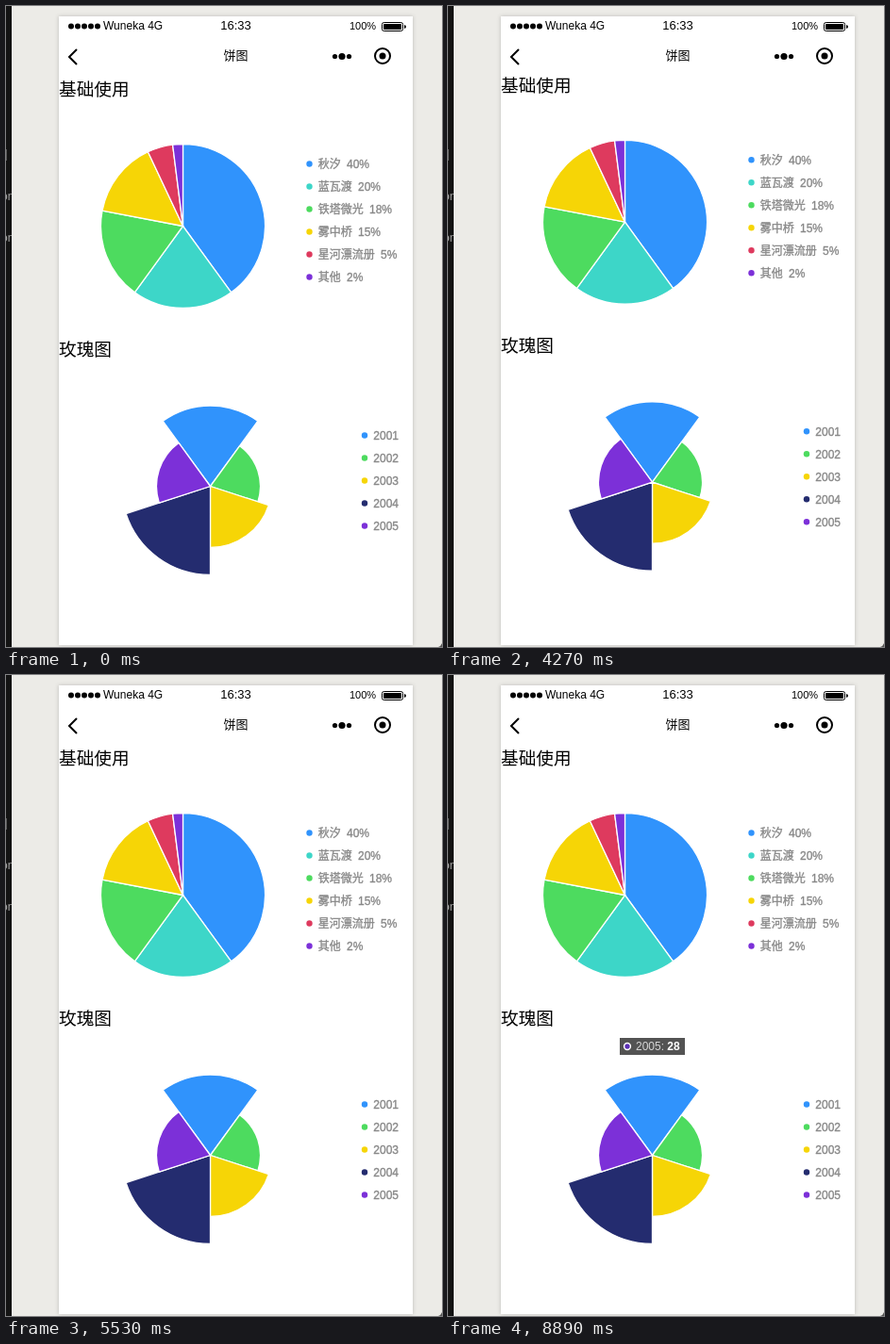
Animation, 462 px wide and 680 px high, one loop 8960 ms. Source, as an HTML page:

```html
<!DOCTYPE html>
<html lang="zh-CN">
<head>
<meta charset="utf-8">
<title>饼图</title>
<style>
  html, body { margin: 0; width: 100%; height: 100%; overflow: hidden; background: #ecebe7; }
  svg { display: block; width: 462px; height: 680px; }
  text { font-family: "Liberation Sans", "Noto Sans CJK SC", "Noto Sans CJK", sans-serif; font-size: 12px; }
  .phone { filter: drop-shadow(0 0 2px rgba(0, 0, 0, .2)); }
  .heading { font-size: 18.67px; }
  .legend { fill: #888; stroke: #888; stroke-width: .35px; }
  .slice { stroke: #fff; stroke-width: 1.3px; stroke-linejoin: round; }
</style>
</head>
<body>
<svg viewBox="0 0 462 680">
  <defs>
    <clipPath id="page"><rect x="56" y="75" width="375" height="603"/></clipPath>
    <clipPath id="strip"><rect width="6" height="680"/></clipPath>
  </defs>
  <rect width="462" height="680" fill="#ecebe7"/>
  <rect width="6" height="680" fill="#131313"/>
  <g clip-path="url(#strip)" fill="#a8a8a8">
    <text x="-2" y="161">]</text>
    <text x="-5" y="206">on</text>
    <text x="-5" y="250">on</text>
  </g>
  <path d="M462 676V680H458Q461 679 462 676Z" fill="#555"/>
  <rect class="phone" x="56" y="11" width="375" height="667" fill="#fff"/>

  <g clip-path="url(#page)">
    <g id="content">
      <text class="heading" x="56" y="95">基础使用</text>
      <text class="heading" x="56" y="371">玫瑰图</text>
      <g id="charts"></g>
      <g id="tip">
        <rect x="182" y="385" width="69" height="18" fill="#535353"/>
        <circle cx="190" cy="394" r="3.4" fill="#5b2fb5" stroke="#fff" stroke-width="1.5"/>
        <text x="199" y="398" fill="#d6d6d6">2005:</text>
        <text x="232.3" y="398" fill="#fff" font-weight="bold">28</text>
      </g>
    </g>
  </g>

  <g id="signal"></g>
  <text x="103" y="25">Wuneka 4G</text>
  <text x="243.5" y="25" text-anchor="middle" style="font-size:13px">16:33</text>
  <text x="364" y="25" style="font-size:11px">100%</text>
  <rect x="398.5" y="17.5" width="22" height="9" rx="2" fill="none" stroke="#000"/>
  <rect x="400" y="19" width="19" height="6" rx=".8"/>
  <path d="M422 20Q424 20.3 424 22T422 24Z"/>
  <path d="M75 46L67 54L75 62" fill="none" stroke="#000" stroke-width="2"/>
  <text x="243.5" y="57" text-anchor="middle" style="font-size:13px">饼图</text>
  <circle cx="348.5" cy="53.5" r="2.6"/>
  <circle cx="356" cy="53.5" r="3.6"/>
  <circle cx="363.5" cy="53.5" r="2.6"/>
  <circle cx="399" cy="53" r="8" fill="none" stroke="#000" stroke-width="2"/>
  <circle cx="399" cy="53" r="3.5"/>
</svg>
<script>
  const LOOP = 8960;
  const blue = '#3093fc', teal = '#3dd6c8', green = '#4ddb5f', yellow = '#f6d506',
        red = '#de3a5e', navy = '#242c6f', purple = '#7c30d8';
  const byId = id => document.getElementById(id);

  function add(parent, tag, attrs, text = '') {
    const el = document.createElementNS('http://www.w3.org/2000/svg', tag);
    for (const key in attrs) el.setAttribute(key, attrs[key]);
    el.textContent = text;
    parent.append(el);
  }

  // Angles are in turns, clockwise from the top.
  function slice(cx, cy, r, from, to, fill) {
    const point = turn => {
      const a = turn * 2 * Math.PI;
      return `${cx + r * Math.sin(a)} ${cy - r * Math.cos(a)}`;
    };
    const d = `M${cx} ${cy}L${point(from)}A${r} ${r} 0 0 1 ${point(to)}Z`;
    add(byId('charts'), 'path', { class: 'slice', d, fill });
  }

  function legend(x, y, fill, label, value = '') {
    const charts = byId('charts');
    add(charts, 'circle', { cx: x, cy: y, r: 3.2, fill });
    add(charts, 'text', { class: 'legend', x: x + 9.3, y: y + 4.3 }, label);
    if (value) add(charts, 'text', { class: 'legend', x: x + 15.5 + 12 * label.length, y: y + 4.3 }, value);
  }

  const shares = [
    ['秋汐', 40, blue], ['蓝瓦渡', 20, teal], ['铁塔微光', 18, green],
    ['雾中桥', 15, yellow], ['星河漂流册', 5, red], ['其他', 2, purple]
  ];
  let turn = 0;
  shares.forEach(([label, percent, color], i) => {
    slice(187.5, 233.5, 87, turn, turn += percent / 100, color);
    legend(321.5, 167.5 + 24 * i, color, label, percent + '%');
  });

  const petals = [[85.5, blue], [53, green], [65, yellow], [94, navy], [57, purple]];
  petals.forEach(([radius, color], i) => {
    slice(216.5, 509.5, radius, i / 5 - .1, i / 5 + .1, color);
    legend(380, 455.5 + 24 * i, color, String(2001 + i));
  });

  for (let i = 0; i < 5; i++) add(byId('signal'), 'circle', { cx: 69 + 7 * i, cy: 21.5, r: 3 });

  function ease(t, start, end) {
    const p = Math.min(1, Math.max(0, (t - start) / (end - start)));
    return p * p * (3 - 2 * p);
  }

  function draw(t) {
    const scroll = 12 * (ease(t, 4130, 4480) - ease(t, 4760, 5110));
    byId('content').setAttribute('transform', `translate(0 ${-scroll})`);
    byId('tip').setAttribute('visibility', t >= 6440 ? 'visible' : 'hidden');
  }

  const start = performance.now();
  function tick() {
    draw((performance.now() - start) % LOOP);
    requestAnimationFrame(tick);
  }
  tick();
</script>
</body>
</html>
```
